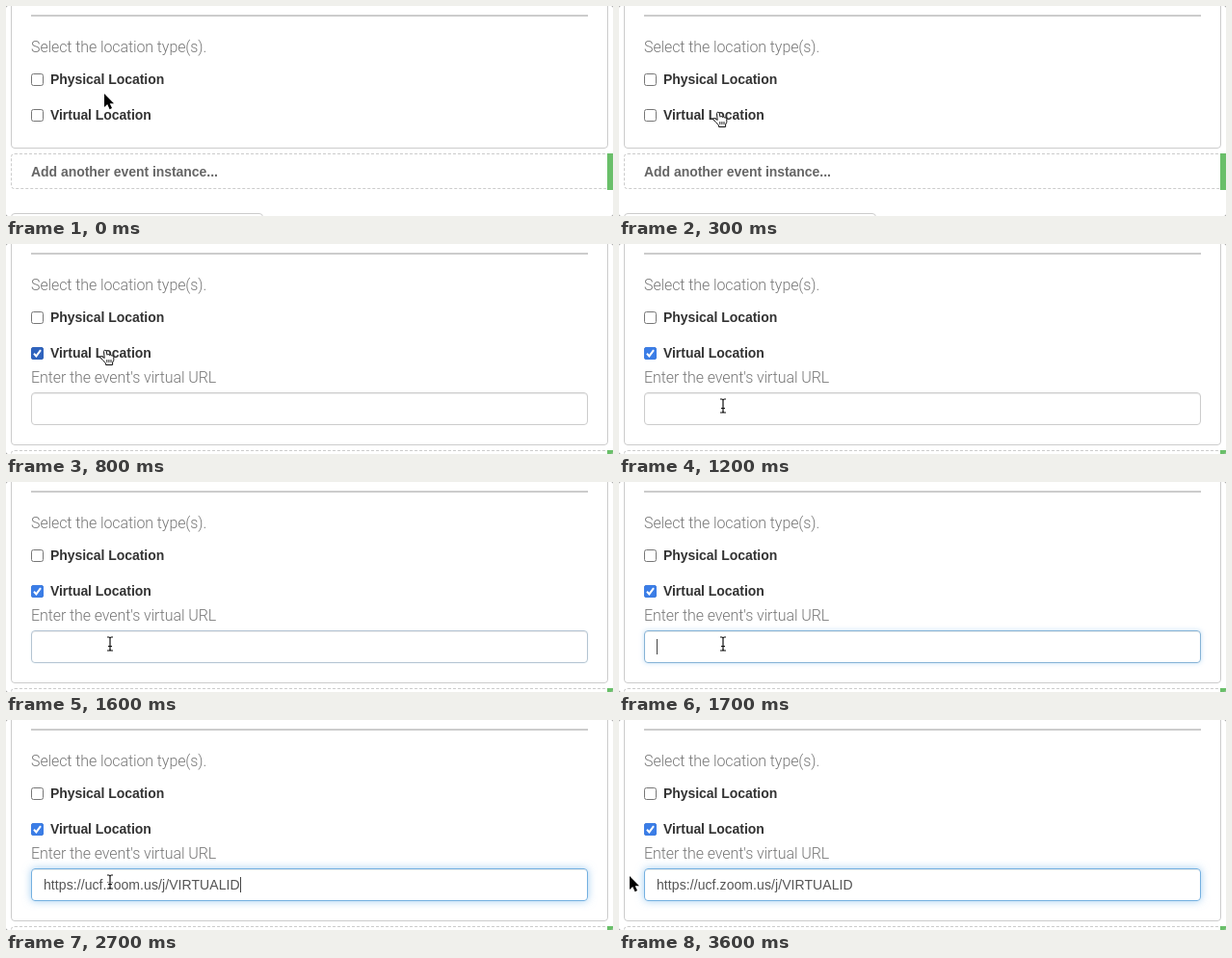
Write an HTML page that moves like this. It is 630x218 px and loops after 3700 ms.

```html
<!DOCTYPE html>
<html lang="en">
<head>
<meta charset="utf-8">
<title>Event location form</title>
<style>
  :root { --loop: 3700ms step-end infinite; }
  * { box-sizing: border-box; }
  html, body { margin: 0; width: 100%; height: 100%; overflow: hidden; background: #888; }
  .stage {
    position: relative; width: 630px; height: 218px; overflow: hidden;
    background: #fff; border-radius: 2px;
    font: 14px/20px "Liberation Sans", Arial, sans-serif;
  }
  .stage div, .stage svg, .stage p { position: absolute; margin: 0; white-space: nowrap; }

  .card { left: 5px; top: -10px; width: 620px; height: 158px; border: 1px solid #ccc; border-radius: 4px; animation: grow var(--loop); }
  .rule { left: 26px; top: 9px; width: 578px; height: 2px; background: #ccc; }
  .below { left: 0; top: 153px; width: 630px; height: 70px; animation: push var(--loop); }
  .add { left: 5px; top: 0; width: 622px; height: 37px; border: 1px dashed #ccc; border-radius: 4px; }
  .green { left: 624px; top: 0; width: 6px; height: 38px; background: #6abf6a; }
  .footer { left: 5px; top: 62px; width: 262px; height: 20px; border: 1px solid #ccc; border-radius: 4px; }

  .hint { left: 26px; color: #777; font: 300 16px/20px Roboto, sans-serif; letter-spacing: -.1px; }
  .label { left: 46px; color: #333; font-weight: bold; letter-spacing: -.05px; }
  .below .label { left: 26px; top: 9px; color: #666; }

  .box { left: 26px; width: 13px; height: 13px; border: 1px solid #767676; border-radius: 2.5px; background: #fff; }
  .tick { left: 26px; top: 107px; animation: check var(--loop); }
  .details { left: 0; top: 0; animation: reveal var(--loop); }
  .input {
    left: 26px; top: 154px; width: 578px; height: 34px;
    border: 1px solid #ccc; border-radius: 4px;
    box-shadow: inset 0 1px 1px rgba(0,0,0,.075);
    animation: focus var(--loop);
  }
  .url { left: 39px; top: 161px; color: #555; letter-spacing: .08px; animation: paste var(--loop); }
  .caret { left: 39px; top: 163px; width: 1px; height: 16px; background: #444; animation: caret var(--loop); }

  .pointer { left: 0; top: 0; animation: move var(--loop); }
  .pointer svg { left: 0; top: 0; overflow: visible; }
  .arrow { animation: arrow var(--loop); }
  .hand { animation: hand var(--loop); }
  .beam { animation: beam var(--loop); }
  .ring { left: -30px; top: -30px; width: 60px; height: 60px; border: 3px solid #111; border-radius: 50%; animation: ring var(--loop); }

  @keyframes grow { 0% { height: 158px } 21.621%, 100% { height: 219px } }
  @keyframes push { 0% { transform: none } 21.621%, 100% { transform: translateY(61px) } }
  @keyframes reveal { 0% { opacity: 0 } 21.621%, 100% { opacity: 1 } }
  @keyframes check { 0% { opacity: 0; fill: #2f63bd } 21.621% { opacity: 1; fill: #2f63bd } 29.729%, 100% { opacity: 1; fill: #3b7de6 } }
  @keyframes focus {
    0% { border-color: #ccc; box-shadow: inset 0 1px 1px rgba(0,0,0,.075) }
    43.243% { border-color: #b4c4d2; box-shadow: inset 0 1px 1px rgba(0,0,0,.075), 0 0 2px rgba(102,175,233,.15) }
    45.945% { border-color: #86b3d6; box-shadow: inset 0 1px 1px rgba(0,0,0,.075), 0 0 5px rgba(102,175,233,.4) }
    48.648%, 100% { border-color: #74b0e0; box-shadow: inset 0 1px 1px rgba(0,0,0,.075), 0 0 8px rgba(102,175,233,.6) }
  }
  @keyframes paste { 0% { opacity: 0 } 72.972%, 100% { opacity: 1 } }
  @keyframes caret {
    0% { opacity: 0; transform: none }
    45.945% { opacity: 1; transform: none }
    59.459% { opacity: 0; transform: none }
    72.972% { opacity: 1; transform: translateX(204px) }
    86.486%, 100% { opacity: 0; transform: translateX(204px) }
  }
  @keyframes move {
    0% { transform: translate(102px, 91px) }
    2.702% { transform: translate(102px, 95px) }
    5.405% { transform: translate(101px, 105px) }
    8.108% { transform: translate(101px, 110px) }
    27.027% { transform: translate(103px, 121px) }
    29.729% { transform: translate(108px, 159px) }
    32.432% { transform: translate(108px, 168px) }
    94.594% { transform: translate(70px, 167px) }
    97.297%, 100% { transform: translate(11px, 162px) }
  }
  @keyframes arrow { 0% { opacity: 1 } 5.405% { opacity: 0 } 97.297%, 100% { opacity: 1 } }
  @keyframes hand { 0% { opacity: 0 } 5.405% { opacity: 1 } 29.729%, 100% { opacity: 0 } }
  @keyframes beam { 0% { opacity: 0 } 29.729% { opacity: 1 } 97.297%, 100% { opacity: 0 } }
  @keyframes ring { 0% { opacity: 0 } 18.918% { opacity: 1 } 21.621%, 100% { opacity: 0 } }
</style>
</head>
<body>
<div class="stage">
  <div class="card"></div>
  <div class="rule"></div>
  <p class="hint" style="top:33px">Select the location type(s).</p>
  <div class="box" style="top:70px"></div>
  <p class="label" style="top:66px">Physical Location</p>
  <div class="box" style="top:107px"></div>
  <svg class="tick" width="13" height="13">
    <rect width="13" height="13" rx="2.5"/>
    <path d="M3 6.8 5.4 9.4 10 3.2" fill="none" stroke="#fff" stroke-width="2"/>
  </svg>
  <p class="label" style="top:103px">Virtual Location</p>

  <div class="details">
    <p class="hint" style="top:129px">Enter the event's virtual URL</p>
    <div class="input"></div>
    <p class="url">https://ucf.zoom.us/j/VIRTUALID</p>
    <div class="caret"></div>
  </div>

  <div class="below">
    <div class="add"></div>
    <p class="label">Add another event instance...</p>
    <div class="green"></div>
    <div class="footer"></div>
  </div>

  <div class="pointer">
    <svg class="arrow" width="12" height="18">
      <path d="M0 0V14L3.2 11 5.6 16.2 8 15.1 5.7 10.2H10Z" fill="#000" stroke="#fff" stroke-width="1" paint-order="stroke"/>
    </svg>
    <svg class="hand" width="16" height="18">
      <path d="M.5 1.5C.5-.2 3-.2 3.2 1.5L4 5.2C4.4 4.2 6.2 4.4 6.4 5.5 7 4.6 8.6 5 8.8 6.2 9.6 5.6 10.8 6.1 10.8 7.5V10.5L9.6 13V15.5H2.6V14L-.6 10.5-3 8C-3.6 6.8-2.2 6-1.2 6.8L1.2 8.4Z" fill="#fff" stroke="#111" stroke-linejoin="round"/>
      <path d="M3.8 10V13M5.9 10V13M8 10V13" stroke="#111" stroke-width=".9"/>
    </svg>
    <svg class="beam" width="8" height="16">
      <path id="i" d="M-3-7H-1.5Q0-7 0-5.5 0-7 1.5-7H3M0-6V6M-3 7H-1.5Q0 7 0 5.5 0 7 1.5 7H3M-2 2.5H2" fill="none" stroke="#fff" stroke-width="2.6"/>
      <use href="#i" style="stroke:#111"/>
      <path d="M-3-7H-1.5Q0-7 0-5.5 0-7 1.5-7H3M0-6V6M-3 7H-1.5Q0 7 0 5.5 0 7 1.5 7H3M-2 2.5H2" fill="none" stroke="#111" stroke-width="1.2"/>
    </svg>
    <div class="ring"></div>
  </div>
</div>
</body>
</html>
```
